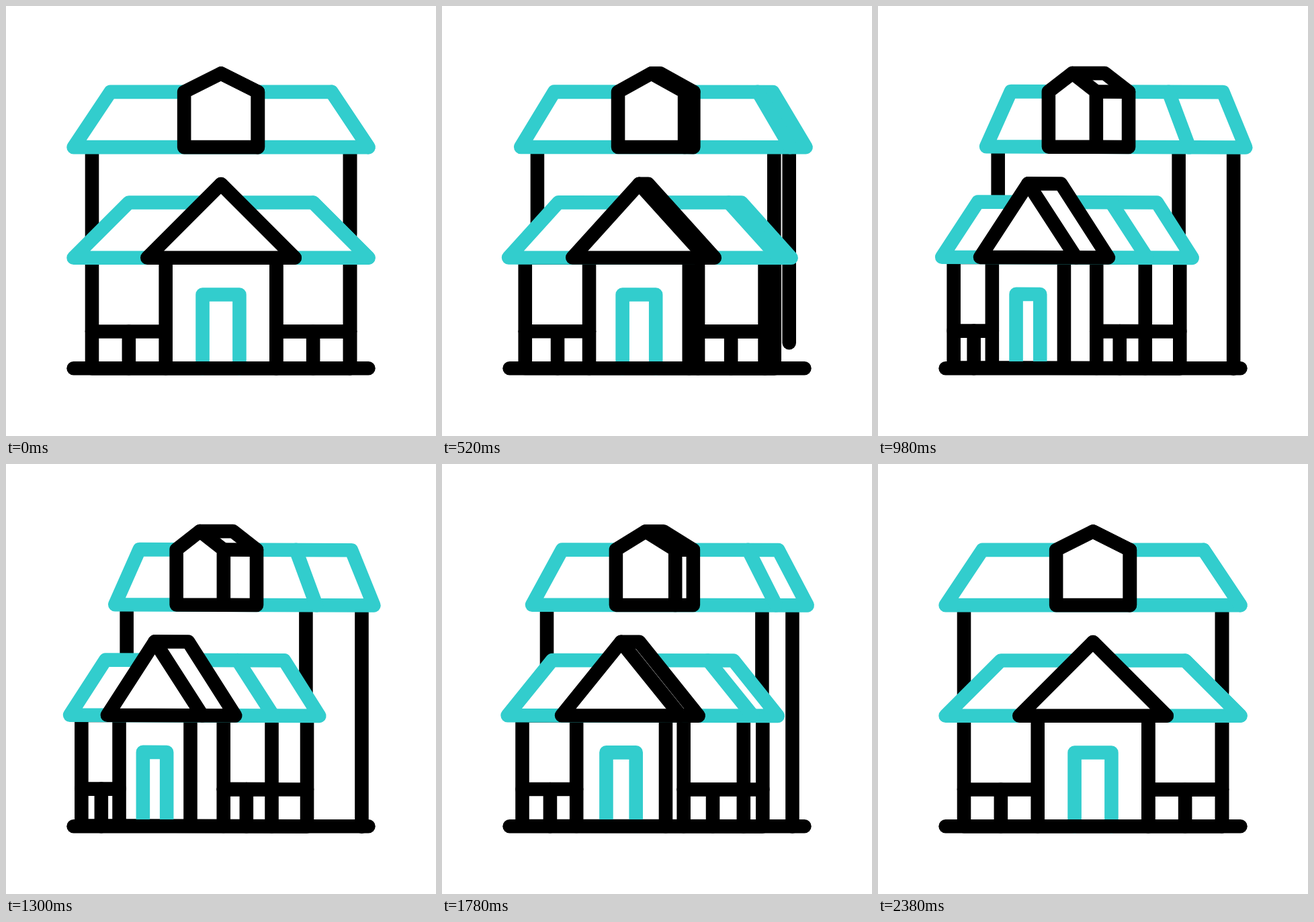
Recreate the animation shown at these times as an HTML page with a canvas. Size 640 by 640 pixels, loop 2.4 s.

```html
<!DOCTYPE html>
<html lang="en">
<head>
<meta charset="utf-8">
<title>Turning house</title>
<style>
  html, body { margin: 0; width: 100%; height: 100%; overflow: hidden; background: #fff; }
  canvas { display: block; }
</style>
</head>
<body>
<canvas id="stage" width="640" height="640"></canvas>
<script>
const ctx = document.getElementById('stage').getContext('2d');
const TEAL = '#32cdcd', BLACK = '#000';
const LOOP = 2400, TURN = 1200;
const UNIT = 27.43, MIDDLE = 320, GROUND = 539.3;
let turn = 0; // 0 = front view, 1 = fully turned

const mix = (a, b, k = turn) => a + (b - a) * k;

// cubic-bezier(.77, 0, .23, 1)
function ease(x) {
  let lo = 0, hi = 1;
  for (let i = 0; i < 24; i++) {
    const u = (lo + hi) / 2;
    if (u * (2.31 + u * (2.62 * u - 3.93)) < x) lo = u; else hi = u;
  }
  return lo * lo * (3 - 2 * lo);
}

// A vertical plane of the house: turning moves its middle and narrows it.
// Columns count from the middle, rows from the ground up.
const plane = (center, scale) => (column, row) => {
  const x = mix(MIDDLE, center) + column * UNIT * mix(1, scale);
  const tilt = turn * (x - 420) / 300;
  return [x, GROUND - row * UNIT + tilt];
};

const upper = {
  wall: plane(313, 0.693), farWall: plane(396.5, 0.693),
  ridge: plane(315, 0.706), farRidge: plane(398, 0.706),
  eave: plane(312, 0.681), farEave: plane(398, 0.681),
};
const lower = {
  wall: plane(253.6, 0.736), farWall: plane(306.4, 0.736),
  ridge: plane(246, 0.715), farRidge: plane(316, 0.715),
  eave: plane(246, 0.688), farEave: plane(315, 0.688),
};
const dormer = plane(288.6, 0.638), farDormer = plane(338, 0.638);
const porch = plane(221, 0.642), farPorch = plane(271, 0.636);

function trace(points) {
  ctx.beginPath();
  for (const [x, y] of points) ctx.lineTo(x, y);
}

function line(color, ...points) {
  trace(points);
  ctx.strokeStyle = color;
  ctx.stroke();
}

function panel(color, ...points) {
  trace(points);
  ctx.closePath();
  ctx.fill();
  ctx.strokeStyle = color;
  ctx.stroke();
}

const post = (at, column, top, bottom = 0) => line(BLACK, at(column, top), at(column, bottom));

function roof({ ridge, farRidge, eave, farEave }, width, bottom) {
  const top = bottom + 3;
  panel(TEAL, ridge(-width, top), farRidge(width, top), farEave(8, bottom), eave(-8, bottom));
  line(TEAL, ridge(width, top), eave(8, bottom));
}

function railing(porchAt, side) {
  const [x0, y] = porchAt(3 * side, 2), [x1] = lower.wall(7 * side, 2);
  const x = mix(x0, x1, mix(0.5, 0.475));
  line(BLACK, [x0, y], [x1, y]);
  line(BLACK, [x, y], [x, GROUND]);
}

function upperFloor() {
  post(upper.wall, -7, 12, 6.3);
  post(upper.wall, 7, 12, 6.3);
  // the far corner comes down to the ground as it leaves the front roof
  post(upper.farWall, 7, 12, Math.max(0, 7.3 - 22 * turn));
  roof(upper, 6, 12);

  panel(BLACK, dormer(-2, 12), dormer(-2, 15), dormer(0, 16),
    farDormer(0, 16), farDormer(2, 15), farDormer(2, 12), dormer(2, 12));
  line(BLACK, dormer(0, 16), dormer(2, 15), dormer(2, 12));
  line(BLACK, dormer(2, 15), farDormer(2, 15));
}

function lowerFloor() {
  const { wall, farWall } = lower;
  panel(BLACK, wall(-7, 0), wall(-7, 6), farWall(7, 6), farWall(7, 0));
  post(wall, 7, 6);
  post(porch, -3, 6);
  post(porch, 3, 6);
  post(farPorch, 3, 6);
  railing(porch, -1);
  railing(farPorch, 1);
  line(BLACK, farPorch(3, 2), farWall(7, 2));
  line(TEAL, porch(-1, 0), porch(-1, 4), porch(1, 4), porch(1, 0));
  roof(lower, 5, 6);

  panel(BLACK, porch(-4, 6), porch(0, 10), farPorch(0, 10), farPorch(4, 6));
  line(BLACK, porch(0, 10), porch(4, 6));
}

function draw(now) {
  const t = now % LOOP;
  turn = ease(Math.max(0, Math.min(t, 2392 - t) / TURN));

  ctx.fillStyle = '#fff';
  ctx.fillRect(0, 0, 640, 640);
  ctx.lineWidth = UNIT * 0.75;
  ctx.lineCap = ctx.lineJoin = 'round';
  upperFloor();
  lowerFloor();
  line(BLACK, [MIDDLE - 8 * UNIT, GROUND], [MIDDLE + 8 * UNIT, GROUND]);
}

const start = performance.now();
function tick() {
  draw(performance.now() - start);
  requestAnimationFrame(tick);
}
tick();
</script>
</body>
</html>
```
